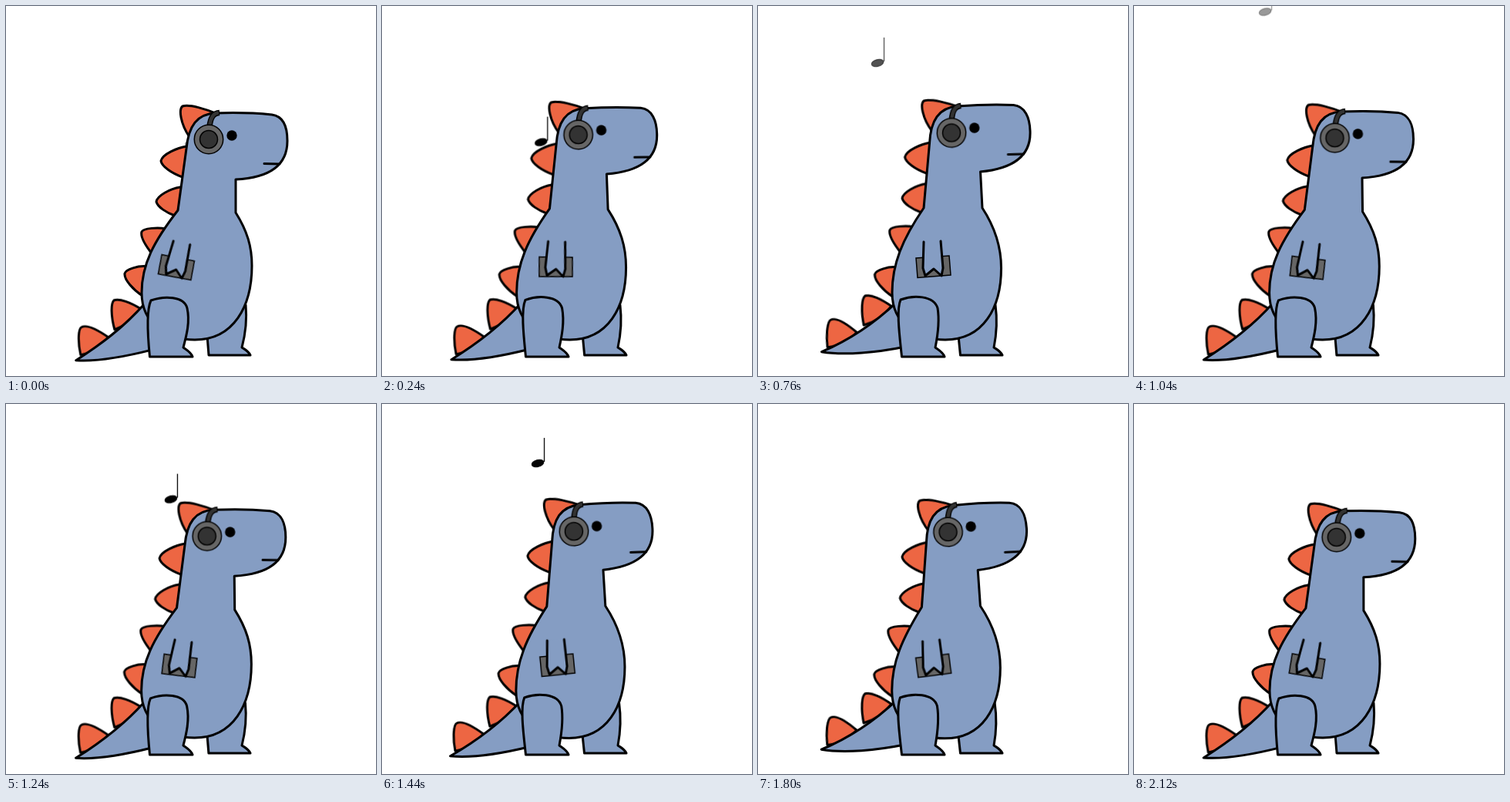
Animation of 480x480 px, one loop 2.16 s. Source, as an HTML page without scripts:

```html
<!DOCTYPE html>
<html lang="en">
<head>
<meta charset="utf-8">
<title>Dinosaur with headphones</title>
<style>
html, body { margin: 0; width: 100%; height: 100%; overflow: hidden; background: #fff; }
svg { display: block; width: 100vw; height: 100vh; }

.line { stroke: #000; stroke-width: 3; stroke-linejoin: round; stroke-linecap: round; }
.skin { fill: #859dc3; }
.spike { fill: #ed6643; }
.thin { stroke: #000; stroke-width: 1.5; }

/* --f leaning forward, --m upright, --b leaning back, --s start if it differs from --f */
.bend { animation: bend 2160ms infinite; }
.move { animation: move 2160ms infinite; }
@keyframes bend {
  0%, 53.2%, 98.6%, 100% { d: var(--f); animation-timing-function: cubic-bezier(.45, .1, .75, .7); }
  14.4%, 35.2%, 65.5%, 86.3% { d: var(--m); animation-timing-function: cubic-bezier(.33, .35, .67, .82); }
  22.4%, 75.5% { d: var(--b); animation-timing-function: cubic-bezier(.4, .2, .7, .75); }
}
@keyframes move {
  0% { transform: var(--s, var(--f, translate(0, 0))); animation-timing-function: cubic-bezier(.45, .1, .75, .7); }
  53.2%, 98.6%, 100% { transform: var(--f, translate(0, 0)); animation-timing-function: cubic-bezier(.45, .1, .75, .7); }
  14.4%, 35.2%, 65.5%, 86.3% { transform: var(--m, translate(0, 0)); animation-timing-function: cubic-bezier(.33, .35, .67, .82); }
  22.4%, 75.5% { transform: var(--b); animation-timing-function: cubic-bezier(.4, .2, .7, .75); }
}

.body {
  --f: path("M298 225L298 268C313 292 319 312 319 337C319 390 295 433 245 433C212 433 176 415 176 372C176 335 192 305 223 265L234 185C237 155 248 140 272 139C300 138 325 139 345 141C360 143 365 158 365 175C365 208 340 223 298 225Z");
  --m: path("M288.5 215L291 262C308 288 315.5 312 315.5 340C315.5 392 292 433 243 433C210 433 174 415 174 372C174 335 187 303 215 262L222.5 178C224 148 234.5 132 258.5 130C286 128 311 127.5 331.5 128.5C346.5 130 352.5 145 353 162C354.5 195 330.5 211 288.5 215Z");
  --b: path("M277 217L282 262C302 290 311.5 318 311.5 347C311.5 398 288 436 240 436C208 436 173 415 173 372C173 335 186 310 206 267L208 186C207.5 156 216 139 240 135C267.5 130.5 292.5 128 312.5 127.5C328 127.5 334.5 142 337 159C341 191 318 209.5 277 217Z");
}
.back-leg {
  --f: path("M261 428L263 453L317 453C314 447 309 445 306 443C310 428 313 410 311 388");
  --m: path("M260 428L262.5 453L317 453C314 447 309 445 306 443C309 428 311 410 308 388");
  --b: path("M259 428L262.5 453L317 453C314 447 309 445 306 443C308 428 309 410 305 388");
}
.front-leg {
  --f: path("M186.5 455L242 455C240 449 234 446 230 443C234 428 239 410 235 392C231 376 205 376 188 382C182 395 184 430 186.5 455Z");
  --m: path("M186.5 455L242 455C240 449 234 446 230 443C233 428 236 410 233 392C228 375 201 375 185 381C179 395 184 430 186.5 455Z");
  --b: path("M186.5 455L242 455C240 449 234 446 230 443C232 428 234 410 231 391C226 375 199 375 183 380.5C178 395 183 430 186.5 455Z");
}
.head {
  transform-origin: 263px 173px;
  --m: translate(-12px, -8.5px) rotate(-2.7deg);
  --b: translate(-27.5px, -3px) rotate(-7.5deg);
}
.arm {
  transform-origin: 227.5px 338px;
  --s: translate(-6.5px, 1px) rotate(15deg);
  --f: translate(-3px, 2px) rotate(14deg);
  --b: translate(.5px, 4.5px) rotate(-10deg);
}
.s2 { --m: translate(-10.5px, -5px); --b: translate(-23px, 3px); }
.s3 { --m: translate(-8px, -4.5px); --b: translate(-17.5px, 4px); }
.s4 { --m: translate(-5px, -2.5px); --b: translate(-11.5px, 6px); }
.s5 { --m: translate(-2.5px, 1px); --b: translate(-5px, 9px); }

/* the tail trails the body a little */
.tail, .ride { animation: tail 2160ms -2106ms infinite cubic-bezier(.55, .1, .85, .7); }
.ride { animation-name: ride; }
@keyframes tail {
  0%, 49.5%, 100% { d: path("M180 386C152 418 122 440 91 460C120 462 155 455 190 446L190 400Z"); }
  29%, 78.5% {
    d: path("M180 384C148 414 118 433 82 448C112 453 155 449 190 442L190 400Z");
    animation-timing-function: cubic-bezier(.45, 0, .6, 1);
  }
}
@keyframes ride {
  0%, 49.5%, 100% { transform: translate(0, 0) rotate(0deg); }
  29%, 78.5% { transform: var(--up); animation-timing-function: cubic-bezier(.45, 0, .6, 1); }
}
.s6 { transform-origin: 173px 391px; --up: translate(-2px, -4px) rotate(4deg); }
.s7 { transform-origin: 133px 429px; --up: translate(-5px, -7px) rotate(6deg); }

.note { stroke: #000; animation: 2160ms linear infinite; }
.n1 { animation-name: drift1, fade; }
.n2 { animation-name: drift2, fade; animation-delay: 0s, -1180ms; }
@keyframes drift1 {
  0%, 4.6% { transform: translate(250px, 178px); }
  13.9% { transform: translate(188px, 176px); }
  18.5% { transform: translate(167px, 159px); }
  22.2% { transform: translate(160px, 140px); }
  30.6% { transform: translate(154px, 97.6px); }
  35.2% { transform: translate(155px, 74px); }
  41.7% { transform: translate(161px, 41px); }
  48.1% { transform: translate(170px, 8px); }
  52.3%, 100% { transform: translate(175px, -13px); }
}
@keyframes drift2 {
  0%, 48% { transform: translate(240px, 178px); }
  53.7% { transform: translate(222px, 142px); }
  60.2% { transform: translate(208px, 110px); }
  66.7% { transform: translate(202px, 77px); }
  73.1% { transform: translate(203px, 44px); }
  83.3%, 100% { transform: translate(214px, -9px); }
}
@keyframes fade {
  0%, 20.4% { fill-opacity: 1; stroke-opacity: 1; }
  66.7%, 100% { fill-opacity: 0; stroke-opacity: 0; }
}
</style>
</head>
<body>
<svg viewBox="0 0 480 480">
  <defs>
    <g id="note">
      <ellipse rx="8" ry="4.4" transform="rotate(-15)"/>
      <path d="M8.5-33V-2" stroke-width="1.3"/>
    </g>
  </defs>

  <use class="note n1" href="#note"/>
  <use class="note n2" href="#note"/>

  <g class="line spike">
    <path class="move head" d="M238 170C226 152 224 134 229 130C238 127 260 134 274 140L274 165Z"/>
    <path class="move s2" d="M235 182C222 184 203 192 201 201C202 208 215 217 229 222L240 222L245 182Z"/>
    <path class="move s3" d="M226 235C213 237 196 246 195 254C197 261 208 268 219 272L232 272L236 235Z"/>
    <path class="move s4" d="M207 289C198 287 178 288 176 293C174 300 182 312 189 321L202 321L218 289Z"/>
    <path class="move s5" d="M184 338C172 336 155 342 154 347C153 355 165 368 177 376L195 376L195 338Z"/>
    <path class="ride s6" d="M141 420C136 402 136 386 140 382C147 379 162 385 175 393Q163 412 141 420Z"/>
    <path class="ride s7" d="M97 453C93 435 94 419 98 417C105 413 120 421 133 430Q119 449 97 453Z"/>
  </g>

  <g class="line skin">
    <path class="tail"/>
    <path class="bend back-leg"/>
    <path class="bend body"/>
    <path class="bend front-leg"/>
  </g>

  <g class="move arm">
    <path class="thin" fill="#666" d="M205 327L248 324L250 349L207 352.5Z"/>
    <path class="line skin" d="M215 306L214 340L217 350L228 341L238 350L240 340L237 305"/>
  </g>

  <g class="move head">
    <g fill="none">
      <path stroke="#000" stroke-width="7.5" d="M264 157C265 146 268 139 277 138.5"/>
      <path stroke="#333" stroke-width="4.5" d="M264 157C265 146 268 139 276 138.5"/>
    </g>
    <circle class="thin" cx="263" cy="173" r="18.7" fill="#666"/>
    <circle class="thin" cx="263" cy="173" r="11.5" fill="#333"/>
    <circle cx="293" cy="168" r="6.7"/>
    <path class="line" d="M335 204.5L355 205"/>
  </g>
</svg>
</body>
</html>
```
